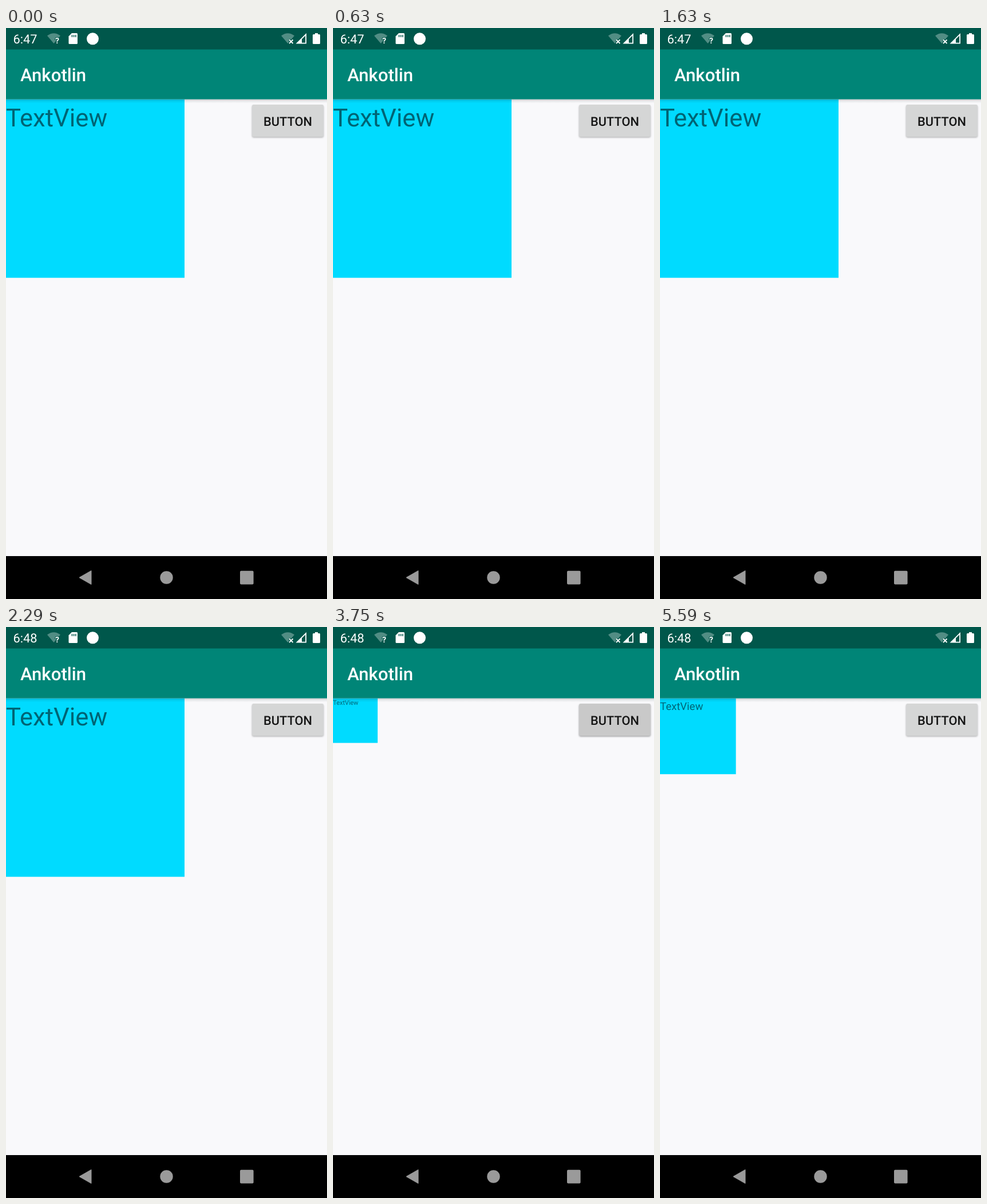
Write an HTML page that moves like this. It is 561x998 px and loops after 5640 ms.

```html
<!DOCTYPE html>
<html lang="en">
<head>
<meta charset="utf-8">
<title>Scale animation</title>
<style>
  html, body { margin: 0; width: 100%; height: 100%; overflow: hidden; background: #f9f9fb; }
  svg { display: block; width: 100%; height: 100%; }
  text { font-family: Roboto, "Noto Sans", sans-serif; text-rendering: geometricPrecision; }
  .medium { font-weight: 500; }
</style>
</head>
<body>
<svg viewBox="0 0 561 998" preserveAspectRatio="none">
  <defs>
    <linearGradient id="barShadow" x1="0" y1="0" x2="0" y2="1">
      <stop offset="0" stop-color="#000" stop-opacity=".2"/>
      <stop offset=".4" stop-color="#000" stop-opacity=".07"/>
      <stop offset="1" stop-color="#000" stop-opacity="0"/>
    </linearGradient>
    <filter id="soft" x="-10%" y="-20%" width="120%" height="150%">
      <feGaussianBlur stdDeviation="1.5"/>
    </filter>
    <path id="wifi" d="M11.5 17.5 L0 4 Q11.5 -4.5 23 4 Z"/>
  </defs>

  <rect width="561" height="998" fill="#f9f9fb"/>

  <!-- Scaled view -->
  <g id="view">
    <rect width="156" height="156" fill="#00dbff"/>
    <text x="0" y="23.5" font-size="21.8" fill="#000" fill-opacity=".54">TextView</text>
  </g>

  <!-- Button -->
  <rect id="shade" x="430" y="135.5" width="125" height="56" rx="3" fill="#000" opacity=".28" filter="url(#soft)"/>
  <rect x="430" y="134" width="125" height="56" rx="3" fill="#d5d6d6"/>
  <rect id="ripple" x="430" y="134" width="125" height="56" rx="3" fill="#000" opacity="0"/>
  <text class="medium" x="492.5" y="170.5" font-size="21.8" text-anchor="middle" fill="#151515">BUTTON</text>

  <!-- App bar -->
  <rect y="124.6" width="561" height="7" fill="url(#barShadow)"/>
  <rect y="37" width="561" height="87.6" fill="#008577"/>
  <text class="medium" x="25" y="93" font-size="31.2" fill="#fff">Ankotlin</text>

  <!-- Status bar -->
  <rect width="561" height="37.5" fill="#00574b"/>
  <g fill="#fff">
    <text id="clock" x="12.5" y="27" font-size="21.8">6:47</text>
    <use href="#wifi" x="72" y="9.5" opacity=".32"/>
    <text x="89.5" y="27" font-size="14" font-weight="700" text-anchor="middle" stroke="#00574b" stroke-width="2" paint-order="stroke">?</text>
    <path d="M115 9 H123.5 Q125 9 125 10.5 V26.5 Q125 28 123.5 28 H111 Q109.5 28 109.5 26.5 V14.5 Z"/>
    <path d="M115.5 12 v4 M118.7 12 v4 M121.9 12 v4" stroke="#00574b" stroke-width="1.5"/>
    <circle cx="151.5" cy="18.8" r="10.5"/>
    <use href="#wifi" x="481" y="9.5" opacity=".32"/>
    <path d="M495 20.5 l6.5 6.5 m0 -6.5 l-6.5 6.5" stroke="#00574b" stroke-width="4"/>
    <path d="M495 20.5 l6.5 6.5 m0 -6.5 l-6.5 6.5" stroke="#fff" stroke-width="1.9"/>
    <path d="M506.5 27.5 L525 9 V27.5 Z"/>
    <path d="M517 19.6 L523.2 13.4 V25.7 H517 Z" fill="#00574b"/>
    <path d="M540 9 h5 v2 h2.5 q1.5 0 1.5 1.5 v14 q0 1.5 -1.5 1.5 h-10 q-1.5 0 -1.5 -1.5 v-14 q0 -1.5 1.5 -1.5 h2.5 Z"/>
  </g>

  <!-- Navigation bar -->
  <rect y="923" width="561" height="75" fill="#000"/>
  <g fill="#9a9a9a">
    <path d="M128 960.5 L149 948.5 V972.5 Z" stroke="#9a9a9a" stroke-linejoin="round"/>
    <circle cx="280.5" cy="960.5" r="11.2"/>
    <rect x="409" y="948.8" width="23.6" height="23.6" rx="2"/>
  </g>
</svg>
<script>
  const LOOP = 5640, STEP = 1000 / 24;
  const MINUTE = 1880, CLICK = 3620, DELAY = 1000, GROW = 3000;
  const SMALL = 0.5, LARGE = 2;

  const byId = id => document.getElementById(id);
  const [view, clock, ripple, shade] = ["view", "clock", "ripple", "shade"].map(byId);
  const clamp = v => Math.min(1, Math.max(0, v));
  const ease = p => (1 - Math.cos(Math.PI * p)) / 2;

  function scaleAt(t) {
    if (t < CLICK) return LARGE;
    return SMALL + (LARGE - SMALL) * ease(clamp((t - CLICK - DELAY) / GROW));
  }

  function pressAt(t) {
    return clamp((t - CLICK + 80) / 100) * (1 - clamp((t - CLICK - 180) / 300));
  }

  function draw(now) {
    const time = now % LOOP;
    const t = Math.floor((time + 2) / STEP) * STEP;
    const press = pressAt(t);
    view.setAttribute("transform", `translate(0 124.6) scale(${scaleAt(t)})`);
    ripple.setAttribute("opacity", 0.06 * press);
    shade.setAttribute("opacity", 0.28 + 0.08 * press);
    const label = t < MINUTE - STEP / 2 ? "6:47" : "6:48";
    if (clock.textContent !== label) clock.textContent = label;
  }

  const start = performance.now();
  function tick() {
    draw(performance.now() - start);
    requestAnimationFrame(tick);
  }
  tick();
</script>
</body>
</html>
```
